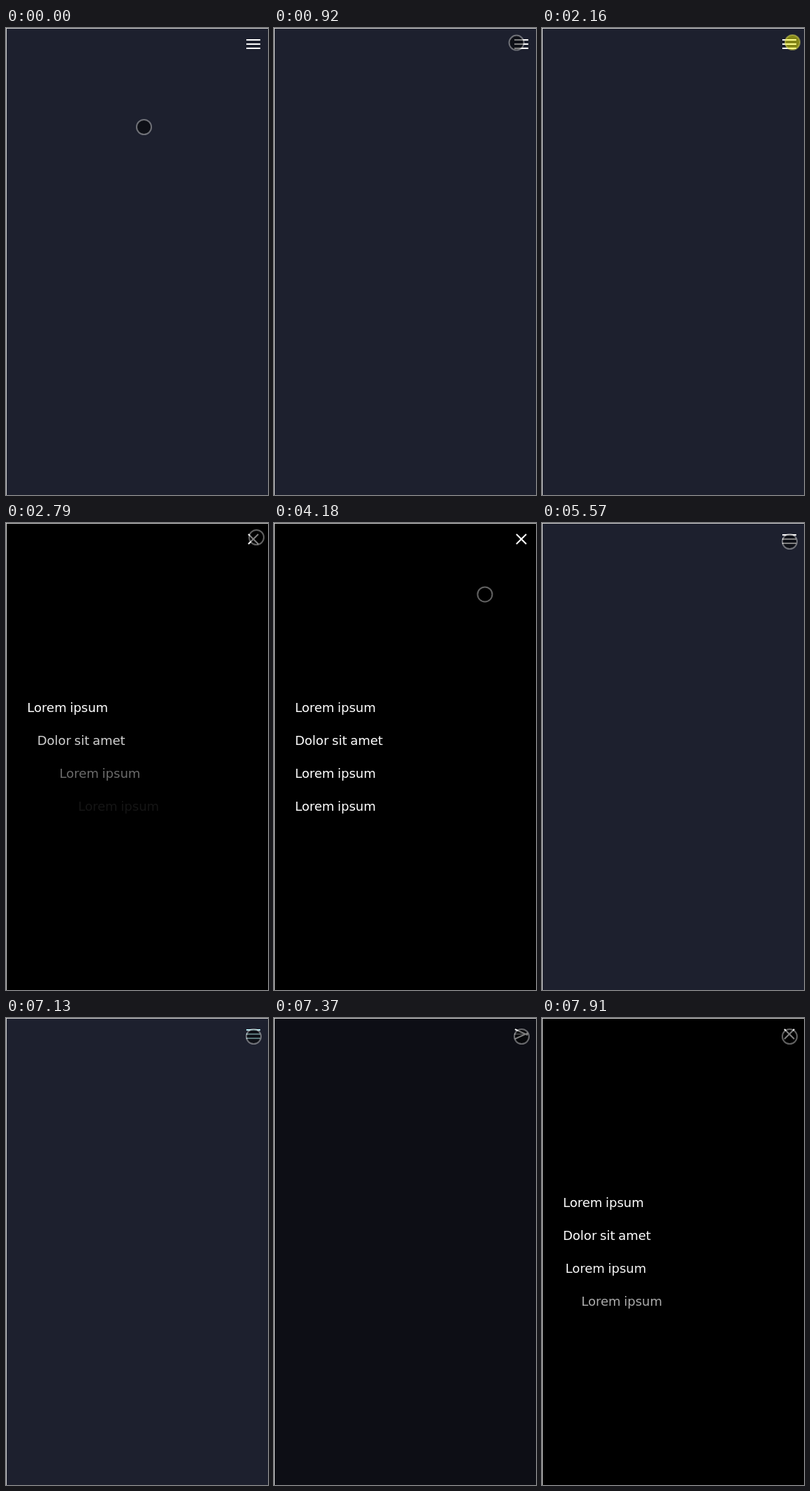
These frames come from a looping animation (375x667 px, 7.99 s). An HTML page with a canvas:

```html
<!DOCTYPE html>
<html lang="en">
<head>
<meta charset="utf-8">
<title>Overlay menu</title>
<style>
  html, body { margin: 0; width: 100%; height: 100%; overflow: hidden; background: #1d202e; }
  canvas { display: block; }
</style>
</head>
<body>
<canvas id="stage" width="375" height="667"></canvas>
<script>
const ctx = document.getElementById('stage').getContext('2d');
const LOOP = 7990;
const DURATION = 400;
const SLIDE = 80;
const ITEMS = ['Lorem ipsum', 'Dolor sit amet', 'Lorem ipsum', 'Lorem ipsum'];

const HOME = { x: 197.5, y: 141.5 };
const MOVES = [
  { at: 290, time: 860, x: 358.5, y: 20.5 },
  { at: 3000, time: 480, x: 263, y: 283.5 },
  { at: 4000, time: 730, x: 352.5, y: 16.5 },
  { at: 4730, time: 230, x: 354.5, y: 26.5 }
];

const clamp = v => Math.min(1, Math.max(0, v));
const mix = (a, b, p) => a + (b - a) * p;
const during = (t, from, length) => t >= from && t < from + length;
const easeOut = p => 1 - (1 - p) ** 2;

// cubic-bezier(.42, 0, .58, 1)
function easeInOut(x) {
  let lo = 0, hi = 1;
  for (let i = 0; i < 24; i++) {
    const s = (lo + hi) / 2;
    const bx = 1.26 * s * (1 - s) ** 2 + 1.74 * s * s * (1 - s) + s ** 3;
    if (bx < x) lo = s; else hi = s;
  }
  return lo * lo * (3 - 2 * lo);
}

const progress = (t, start) => easeInOut(clamp((t - start) / DURATION));

// The pointer sweeps in arcs: its height runs ahead of its sideways motion.
function pointerAt(t) {
  let { x, y } = HOME;
  for (const move of MOVES) {
    const p = easeOut(clamp((t - move.at) / move.time));
    x = mix(x, move.x, p);
    y = mix(y, move.y, easeOut(p));
  }
  return { x, y };
}

function drawMenu(t, openedAt, shown) {
  ctx.globalAlpha = shown;
  ctx.fillStyle = '#000';
  ctx.fillRect(0, 0, 375, 667);
  ctx.fillStyle = '#fff';
  ctx.font = '18px "DejaVu Sans", sans-serif';
  ctx.wordSpacing = '-1px';
  ITEMS.forEach((label, i) => {
    const p = progress(t, openedAt + 210 + i * 100);
    ctx.globalAlpha = shown * p;
    ctx.fillText(label, 30 + SLIDE * (1 - p), 270 + 47 * i);
  });
  ctx.globalAlpha = 1;
}

function drawBar(offset, angle, alpha) {
  ctx.save();
  ctx.globalAlpha = alpha;
  ctx.translate(354, 23 + offset);
  ctx.rotate(angle);
  ctx.fillRect(-10, -1, 20, 2);
  ctx.restore();
}

function drawButton(open, color) {
  ctx.fillStyle = color;
  const turn = open * Math.PI / 4, gap = 6 * (1 - open);
  drawBar(-gap, turn, 1);
  drawBar(0, 0, 1 - open);
  drawBar(gap, -turn, 1);
}

function drawPointer({ x, y }, pressed) {
  ctx.beginPath();
  ctx.arc(x, y, 10.5, 0, 2 * Math.PI);
  ctx.fillStyle = pressed ? 'rgba(255,255,0,.46)' : 'rgba(0,0,0,.5)';
  ctx.fill();
  ctx.lineWidth = 2;
  ctx.strokeStyle = pressed ? 'rgba(220,220,90,.5)' : 'rgba(255,255,255,.38)';
  ctx.stroke();
}

function draw(t) {
  const openedAt = t < 6000 ? 2200 : 7160;
  const closing = t < 6000 ? progress(t, 5150) : 0;
  const open = progress(t, openedAt) * (1 - closing);
  ctx.fillStyle = '#1d202e';
  ctx.fillRect(0, 0, 375, 667);
  if (open > 0) drawMenu(t, openedAt, open);
  drawButton(open, during(t, 7130, 100) ? '#b4eaf2' : '#fff');
  drawPointer(pointerAt(t), during(t, 2160, 150) || during(t, 5110, 150));
  ctx.fillStyle = '#d0d0d0';
  ctx.fillRect(0, 0, 375, 1);
  ctx.fillRect(0, 0, 1, 667);
}

const start = performance.now();
function frame() {
  draw((performance.now() - start) % LOOP);
  requestAnimationFrame(frame);
}
frame();
</script>
</body>
</html>
```
